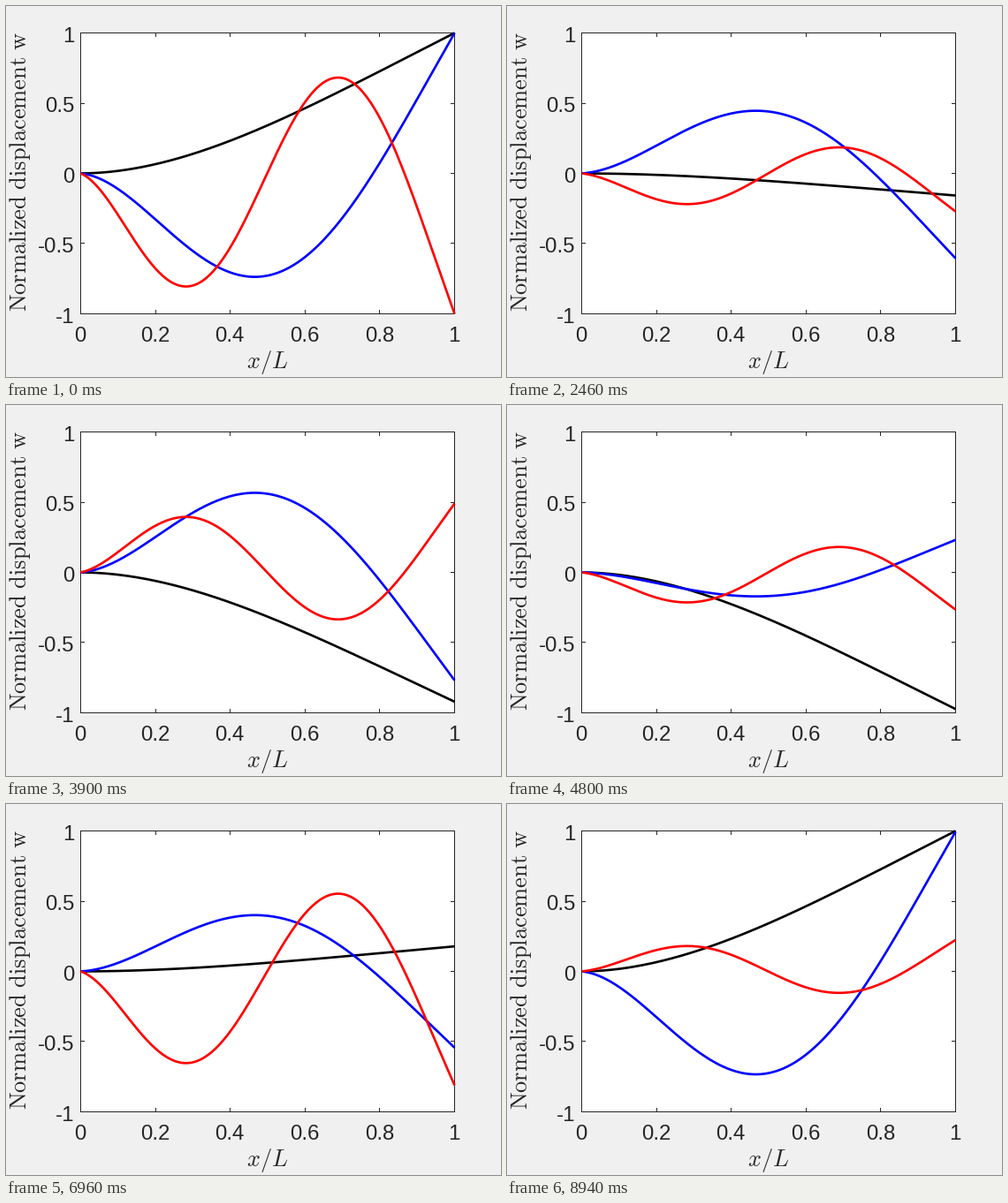
These frames come from a looping animation (560x420 px, 9 s). A matplotlib script:

```python
import numpy as np
import matplotlib.pyplot as plt
from matplotlib.animation import FuncAnimation
from matplotlib.patches import Rectangle

plt.rcParams["mathtext.fontset"] = "cm"
plt.rcParams["font.family"] = "Liberation Sans"

W, H, DPI = 560, 420, 80
PT = 72 / DPI                      # points per pixel
FRAMES, STEP = 150, 60
LEFT, RIGHT, TOP, BOTTOM = 84.5, 507.5, 30.5, 348.5
INK = "#262626"

# Thick (Timoshenko) cantilever: rotary inertia and shear terms
R2 = 1 / 1200
S2 = 3.12 * R2


def wave_numbers(b):
    root = np.sqrt((R2 - S2) ** 2 + 4 / b**2)
    return b * np.sqrt((root - R2 - S2) / 2), b * np.sqrt((root + R2 + S2) / 2)


def residual(b):
    p, q = wave_numbers(b)
    shear = b * (R2 + S2) / np.sqrt(1 - b**2 * R2 * S2)
    return (2 + (b**2 * (R2 - S2) ** 2 + 2) * np.cosh(p) * np.cos(q)
            - shear * np.sinh(p) * np.sin(q))


def bisect(lo, hi):
    for _ in range(60):
        mid = (lo + hi) / 2
        if residual(lo) * residual(mid) <= 0:
            hi = mid
        else:
            lo = mid
    return (lo + hi) / 2


def mode_shape(b, x):
    p, q = wave_numbers(b)
    m = (p**2 + b**2 * S2) / p
    n = (q**2 - b**2 * S2) / q
    c = -((m * p * np.cosh(p) + n * q * np.cos(q))
          / (m * (p * np.sinh(p) + q * np.sin(q))))
    w = (np.cosh(p * x) - np.cos(q * x)
         + c * (np.sinh(p * x) - m / n * np.sin(q * x)))
    return w / w[-1]


def px(x):
    return LEFT + (RIGHT - LEFT) * x


def py(y):
    return (TOP + BOTTOM) / 2 - (BOTTOM - TOP) / 2 * y


def pixel_centre(v):
    return np.rint(v - 0.5) + 0.5


fig = plt.figure(figsize=(W / DPI, H / DPI), dpi=DPI, facecolor="#f0f0f0")
ax = fig.add_axes([0, 0, 1, 1])
ax.set_xlim(0, W)
ax.set_ylim(H, 0)
ax.axis("off")


def rule(xs, ys):
    ax.plot(xs, ys, color=INK, lw=PT, snap=False, solid_capstyle="butt", zorder=2)


def label(x, y, text, size=24, **kw):
    ax.text(x, y, text, fontsize=size * PT, color=INK, va="baseline", **kw)


ax.add_patch(Rectangle((LEFT, TOP), RIGHT - LEFT, BOTTOM - TOP,
                       fc="white", ec="none", snap=False, zorder=1))
for edge in (TOP, BOTTOM):
    rule([LEFT - 0.5, RIGHT + 0.5], [edge, edge])
for edge in (LEFT, RIGHT):
    rule([edge, edge], [TOP - 0.5, BOTTOM + 0.5])

TICK = 4.5
for v in np.linspace(0, 1, 6):
    x = pixel_centre(px(v))
    rule([x, x], [BOTTOM, BOTTOM - TICK])
    rule([x, x], [TOP, TOP + TICK])
    label(px(v) - 0.4, 380.5, f"{v:.1g}", ha="center")
for v in np.linspace(-1, 1, 5):
    y = pixel_centre(py(v))
    rule([LEFT, LEFT + TICK], [y, y])
    rule([RIGHT, RIGHT - TICK], [y, y])
    label(77.5, py(v) + 10.1, f"{v:g}", ha="right")

label(296, 410, "$x/L$", 26.4, ha="center")
label(23, 188, r"$\mathrm{Normalized\ displacement\ w}$", 26.4,
      ha="center", rotation=90, rotation_mode="anchor")

# colour, root bracket, tip sign, cycles per loop
MODES = [("black", (3, 4), 1, 1.0),
         ("blue", (20, 22.5), 1, 5.9838),
         ("red", (53, 58), -1, 15.286)]

grid = np.linspace(0, 1, 201)
curves = []
for colour, bracket, sign, cycles in MODES:
    shape = sign * mode_shape(bisect(*bracket), grid)
    line, = ax.plot(px(grid), py(shape), color=colour, lw=2.67 * PT,
                    solid_capstyle="butt", solid_joinstyle="round", zorder=4)
    curves.append((line, shape, cycles))


def draw(i):
    turn = 2 * np.pi * i / (FRAMES - 1)
    for line, shape, cycles in curves:
        line.set_ydata(py(shape * np.cos(cycles * turn)))
    return [c[0] for c in curves]


anim = FuncAnimation(fig, draw, frames=FRAMES, interval=STEP,
                     repeat=True, repeat_delay=0)
plt.show()
```
